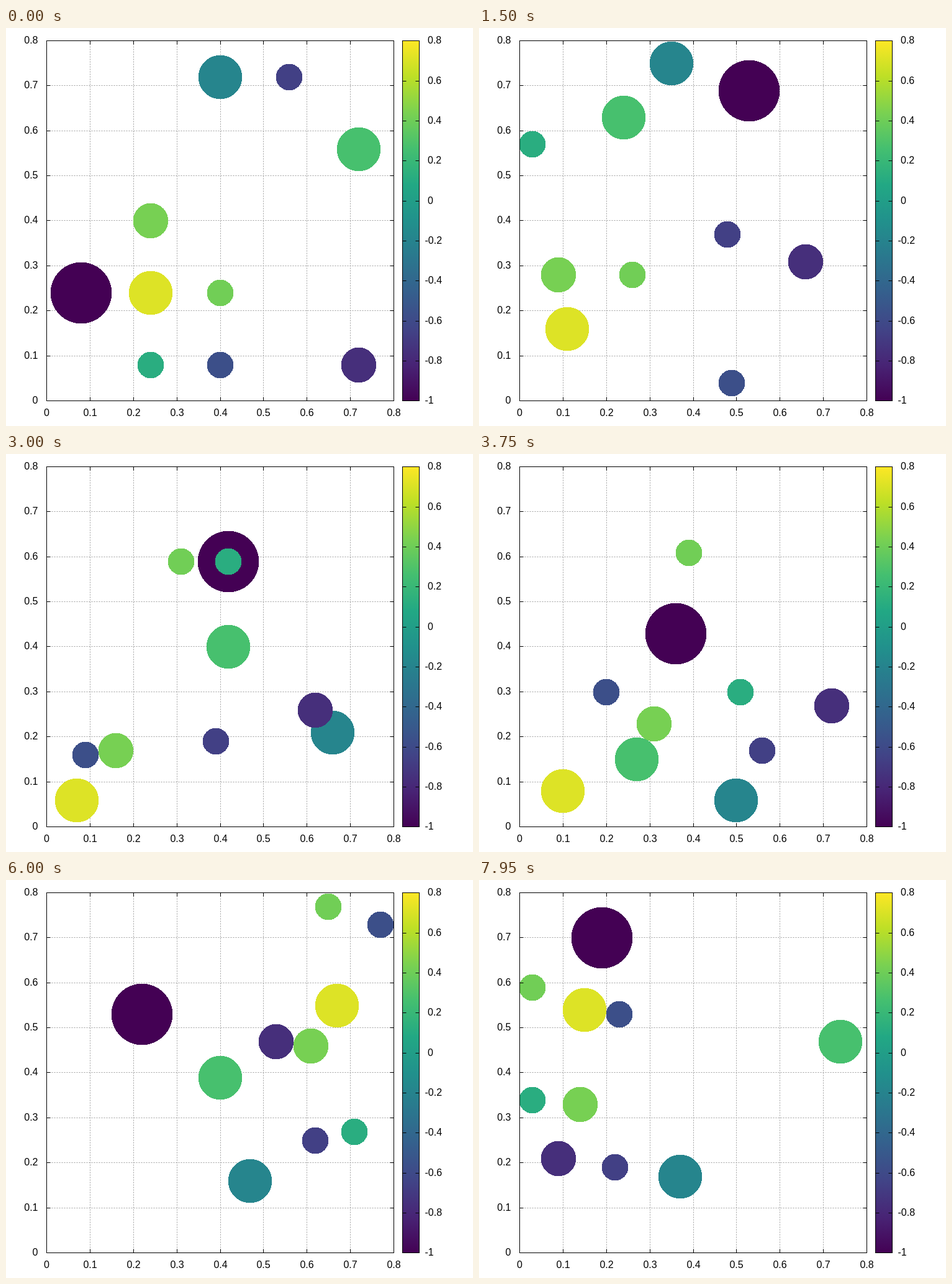
An HTML page that plays this animation: 752 by 640 pixels, repeating every 8 s.

```html
<!DOCTYPE html>
<html lang="en">
<head>
<meta charset="utf-8">
<title>Bouncing discs</title>
<style>
  html, body { margin: 0; width: 100%; height: 100%; overflow: hidden; background: #fff; }
  svg { display: block; }
  text { font: 16px "Liberation Sans", Arial, sans-serif; fill: #000; }
</style>
</head>
<body>
<svg width="752" height="640" viewBox="0 0 752 640">
  <defs><linearGradient id="scale" x1="0" y1="1" x2="0" y2="0"></linearGradient></defs>
  <rect width="752" height="640" fill="#fff"/>
  <g id="grid" stroke="#a0a0a0" stroke-dasharray="2 2"></g>
  <g id="balls" shape-rendering="crispEdges"></g>
  <rect x="638.5" y="20.5" width="27" height="579" fill="url(#scale)"/>
  <g id="axes" stroke="#000" fill="none">
    <rect x="65.5" y="20.5" width="559" height="579"/>
    <rect x="638.5" y="20.5" width="27" height="579"/>
  </g>
  <g id="labels"></g>
</svg>
<script>
const LEFT = 65.5, RIGHT = 624.5, TOP = 20.5, BOTTOM = 599.5;
const SIDE = 80; // the box is 80 hundredths wide and high
const UNIT_X = (RIGHT - LEFT) / SIDE, UNIT_Y = (BOTTOM - TOP) / SIDE;
const LOOP = 8000, STEP = 150;

const byId = id => document.getElementById(id);
const mod = (a, n) => ((a % n) + n) % n;
const mix = (a, b, k) => a + (b - a) * k;

function add(parent, tag, attrs, text) {
  const el = document.createElementNS("http://www.w3.org/2000/svg", tag);
  for (const key in attrs) el.setAttribute(key, attrs[key]);
  if (text !== undefined) el.textContent = text;
  return byId(parent).appendChild(el);
}
const line = (parent, x1, y1, x2, y2) => add(parent, "line", { x1, y1, x2, y2 });
const label = (x, y, anchor, text) =>
  add("labels", "text", { x, y: y + 4.5, "text-anchor": anchor }, text);

// Axes, grid and labels
for (let i = 0; i <= 8; i++) {
  const x = Math.floor(LEFT + i * 10 * UNIT_X) + 0.5;
  const y = Math.ceil(BOTTOM - i * 10 * UNIT_Y) - 0.5;
  const text = String(i / 10);
  if (i > 0 && i < 8) {
    line("grid", x, BOTTOM, x, TOP);
    line("grid", LEFT, y, RIGHT, y);
  }
  line("axes", x, BOTTOM, x, BOTTOM - 6);
  line("axes", x, TOP, x, TOP + 6);
  line("axes", LEFT, y, LEFT + 6, y);
  line("axes", RIGHT, y, RIGHT - 6, y);
  label(x, 619.5, "middle", text);
  label(51.5, y, "end", text);
}

// Colour scale from -1 to 0.8
const shades = ["#440154", "#482475", "#414487", "#355f8d", "#2a788e", "#21918c",
  "#22a884", "#44bf70", "#7ad151", "#bddf26", "#fde725"];
shades.forEach((shade, i) =>
  add("scale", "stop", { offset: i / (shades.length - 1), "stop-color": shade }));

function shadeOf(value) {
  const t = (value + 1) / 1.8 * (shades.length - 1), i = Math.floor(t);
  const channel = (shade, c) => parseInt(shade.substr(1 + 2 * c, 2), 16);
  const rgb = [0, 1, 2].map(c =>
    Math.round(mix(channel(shades[i], c), channel(shades[i + 1], c), t - i)));
  return `rgb(${rgb})`;
}

for (let i = 0; i <= 9; i++) {
  const y = Math.ceil(BOTTOM - 0.5 - i * (BOTTOM - TOP) / 9) + 0.5;
  const value = (i - 5) / 5;
  line("axes", 638.5, y, 644.5, y);
  line("axes", 665.5, y, 659.5, y);
  label(value < 0 ? 674.5 : 679, y, "start", String(value));
}

// Each ball starts in a lattice cell and flies straight between knocks.
// A point beyond a wall is reached by bouncing off that wall.
const knocks = [0, 10, 16, 25, 31, 40, 53];
const cell = n => 8 + 16 * n;

function ball(r, value, col, row, xs, ys) {
  const el = add("balls", "circle", { r: r * UNIT_X + 0.4, fill: shadeOf(value) });
  return { r, el, xs: [cell(col), ...xs], ys: [cell(row), ...ys] };
}

const balls = [
  ball(7, -1, 0, 1, [-39, 46, 36, 31, 22, 19], [69, 72, 43, 40, 53, 70]),
  ball(3, 0.12, 1, 0, [3, 35, 51, 69, 83, 3], [57, 72, 124, 20, 27, 34]),
  ball(5, 0.71, 1, 1, [11, 6, 0, 21, 67, 135], [16, 10, 2, 20, 55, 96]),
  ball(4, 0.43, 1, 2, [9, 4, 31, 38, 61, 138], [28, 12, 23, 25, 46, 33]),
  ball(3, -0.57, 2, 0, [49, 27, -14, 24, 77, 23], [2, 2, 30, 66, 81, 101]),
  ball(3, 0.41, 2, 1, [26, 25, 39, 68, 89, 3], [28, 58, 61, 55, 77, 59]),
  ball(5, -0.19, 2, 4, [35, 71, 100, 56, 47, 37], [75, 33, 6, 1, 16, 17]),
  ball(3, -0.66, 3, 4, [48, 26, 56, 74, 92, 22], [37, 21, 17, 8, 25, -13]),
  ball(4, -0.76, 4, 0, [66, 104, 80, 52, 53, 9], [-23, 25, 27, 45, 47, -13]),
  ball(5, 0.27, 4, 3, [126, 54, 27, 32, -30, 74], [63, 60, 15, 5, 39, 47])
];

function bounce(v, r) {
  const span = SIDE - 2 * r, u = mod(v - r, 2 * span);
  return r + (u > span ? 2 * span - u : u);
}

function place(points, r, i, k) {
  return Math.round(bounce(mix(bounce(points[i], r), points[i + 1], k), r));
}

function draw(time) {
  const step = Math.floor((time % LOOP) / STEP);
  let i = 0;
  while (i < knocks.length - 2 && step >= knocks[i + 1]) i++;
  const k = (step - knocks[i]) / (knocks[i + 1] - knocks[i]);
  for (const { r, xs, ys, el } of balls) {
    el.setAttribute("cx", Math.floor(LEFT + place(xs, r, i, k) * UNIT_X));
    el.setAttribute("cy", Math.ceil(BOTTOM - place(ys, r, i, k) * UNIT_Y));
  }
}

const start = performance.now();
function tick() {
  draw(performance.now() - start);
  requestAnimationFrame(tick);
}
tick();
</script>
</body>
</html>
```
